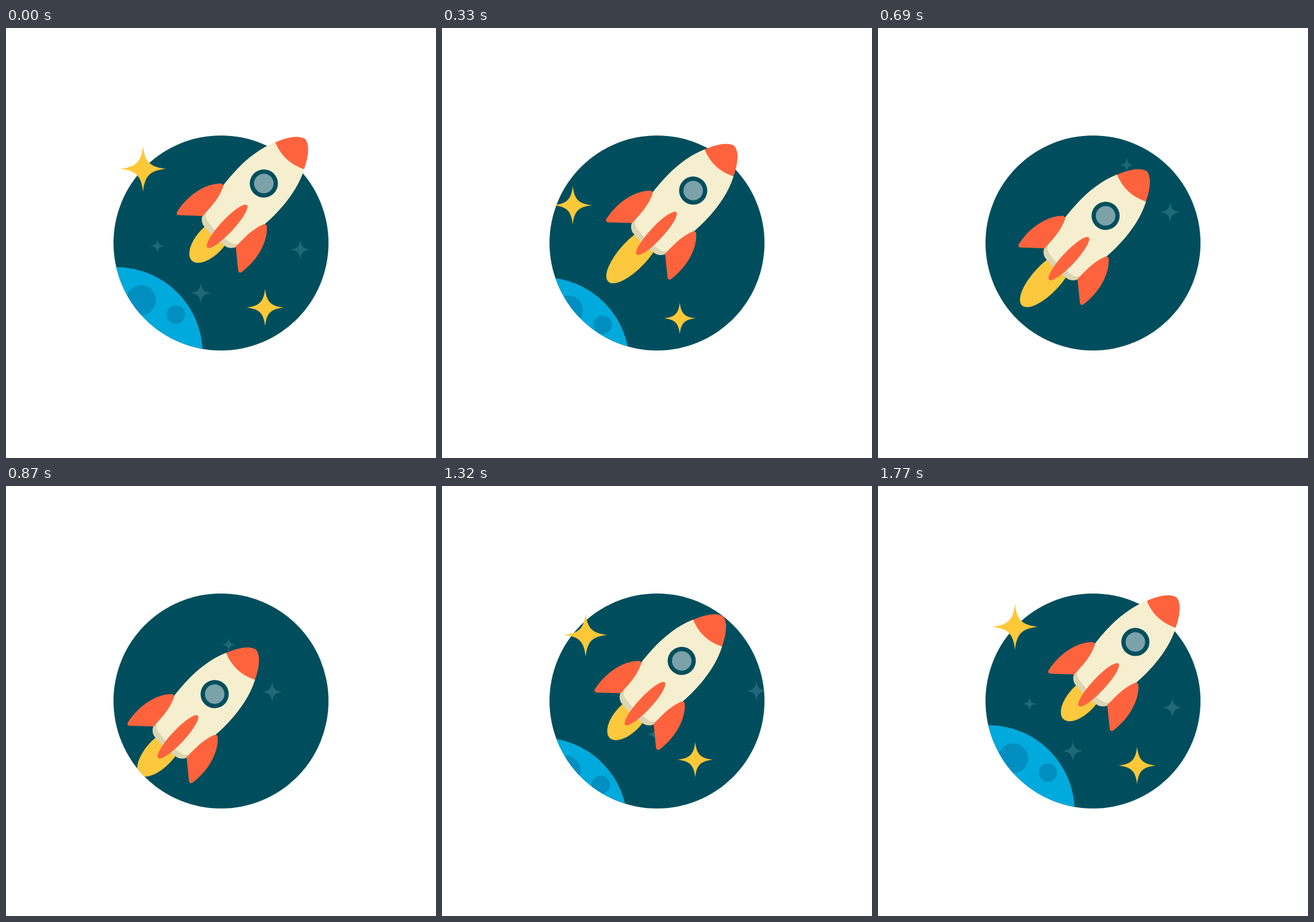
An HTML page that plays this animation: 748x748 px, repeating every 1800 ms.

```html
<!DOCTYPE html>
<html lang="en">
<head>
<meta charset="utf-8">
<title>Rocket</title>
<style>
html, body { margin: 0; width: 100%; height: 100%; overflow: hidden; background: #fff; }
svg { display: block; width: 748px; height: 748px; }
</style>
</head>
<body>
<svg viewBox="0 0 748 748">
  <defs>
    <clipPath id="disc"><circle cx="374" cy="374" r="187"/></clipPath>
    <!-- the disc, open towards the top -->
    <clipPath id="stageClip"><path d="M0 0H748V374H561A187 187 0 0 1 187 374H0Z"/></clipPath>
    <path id="star" d="M0-1C.08-.3 .3-.08 1 0C.3 .08 .08 .3 0 1C-.08 .3-.3 .08-1 0C-.3-.08-.08-.3 0-1Z"/>
    <path id="fin" d="M39 113.5C40 96 38 76 47.5 53Q50 48.5 54 50.5C70 64 84 98 77 138Q76 144 71 141.5Z"/>
    <path id="body" d="M-34.3-66C-46-42-51-12-51 18C-51 48-46 80-41 109Q-39 121-28 125Q0 130 28 125Q39 121 41 109C46 80 51 48 51 18C51-12 46-42 34.3-66Z"/>
    <clipPath id="bodyClip"><use href="#body"/></clipPath>
  </defs>
  <circle cx="374" cy="374" r="187" fill="#004e5d"/>
  <g clip-path="url(#disc)">
    <g id="farStars" fill="#206878">
      <use href="#star" transform="translate(512 385.5) scale(17.8)"/>
      <use href="#star" transform="translate(339 461) scale(18.3)"/>
      <use href="#star" transform="translate(263.5 379) scale(12.3)"/>
    </g>
    <g id="moon">
      <circle cx="192" cy="566" r="150" fill="#00aadd"/>
      <circle cx="235" cy="473.5" r="26" fill="#008fc0"/>
      <circle cx="295.500" cy="498.500" r="16" fill="#008fc0"/>
    </g>
  </g>
  <g clip-path="url(#stageClip)">
    <use id="bigStar" href="#star" fill="#ffc839"/>
    <use id="smallStar" href="#star" fill="#ffc839"/>
    <g id="rocket">
      <ellipse id="flame" rx="24.500" fill="#fcc83d"/>
      <use href="#body" fill="#dbd5b1"/>
      <path clip-path="url(#bodyClip)" fill="#f6efcf" d="M-60-70H60V98H43Q40 112 28 115Q0 120-26 115Q-39 112-42 98H-60Z"/>
      <path fill="#ff633d" d="M-34.300-66C-28-80-22-90-13.500-98.500Q-5-105.500 0-105.500Q5-105.500 13.500-98.500C22-90 28-80 34.300-66Q0-50-34.300-66Z"/>
      <g fill="#ff633d">
        <use href="#fin"/>
        <use href="#fin" transform="scale(-1 1)"/>
        <ellipse cx="4" cy="98" rx="11.500" ry="50.500"/>
      </g>
      <circle r="24.500" fill="#004e5d"/>
      <circle r="17" fill="#7ba2a8"/>
    </g>
  </g>
</svg>
<script>
const LOOP = 1800, STEP = 30, TURN = 900;
const el = id => document.getElementById(id);

// Monotone cubic curve through [time, value] keys.
function curve(keys) {
  const slope = i => (keys[i + 1][1] - keys[i][1]) / (keys[i + 1][0] - keys[i][0]);
  const last = keys.length - 1;
  const tangent = i => {
    if (i === 0) return slope(0);
    if (i === last) return slope(last - 1);
    const a = slope(i - 1), b = slope(i);
    return a * b <= 0 ? 0 : 2 * a * b / (a + b);
  };
  return t => {
    if (t <= keys[0][0]) return keys[0][1];
    if (t >= keys[last][0]) return keys[last][1];
    const i = keys.findIndex(k => k[0] > t) - 1;
    const [t0, v0] = keys[i], [t1, v1] = keys[i + 1];
    const h = t1 - t0, u = (t - t0) / h, w = 1 - u;
    return w * w * (1 + 2 * u) * v0 + u * u * (3 - 2 * u) * v1
      + h * u * w * (w * tangent(i) - u * tangent(i + 1));
  };
}

const rocketOut = curve([[0, 0], [180, 4.5], [480, 22.5], [870, 85.5], [900, 91]]);
const rocketBack = curve([[900, 91], [1080, 60.5], [1320, 31.5], [1620, 5], [1770, 0.8], [1800, 0]]);
const moonOut = curve([[0, 0], [180, 5], [480, 33], [900, 80]]);
const moonBack = curve([[900, 80], [1080, 46], [1320, 20.5], [1620, 2.5], [1740, 0]]);
const flameGrow = curve([[0, 0], [180, 8.5], [500, 22], [870, 4], [960, 0]]);
const farIn = curve([[540, 272], [870, 161], [1080, 108], [1320, 45.5], [1560, 5], [1700, 0]]);
const starIn = curve([[900, 1.35], [1080, 1], [1320, 0.138], [1560, 0]]);

const move = (node, x, y, rest = "") =>
  node.setAttribute("transform", `translate(${x} ${y}) ${rest}`);

// Stars sink away along `out`, then fly out from behind the rocket along `back`.
function placeStar(node, x, y, r, out, back, t) {
  const leaving = t < TURN;
  const k = leaving ? 0.31 * (t / 480) ** 1.86 : starIn(t);
  const [dx, dy] = leaving ? out : back;
  const size = Math.max(0, 1 - k * (leaving ? 1 : 0.36));
  move(node, x + dx * k, y + dy * k, `scale(${r * size})`);
}

function draw(t) {
  const leaving = t < TURN;

  const p = leaving ? rocketOut(t) : rocketBack(t);
  move(el("rocket"), 448.5 - p, 270.5 + 1.07 * p, "rotate(43)");
  const len = 48.5 + flameGrow(t);
  el("flame").setAttribute("ry", len);
  el("flame").setAttribute("cy", 86.5 + len);

  const m = leaving ? moonOut(t) : moonBack(t);
  move(el("moon"), -0.95 * m, 1.05 * m);

  if (t < 520) {
    const k = (t / 180) ** 1.7;
    move(el("farStars"), -100 * k, 58 * k);
  } else {
    const s = farIn(t);
    move(el("farStars"), 0.77 * s, -0.64 * s);
  }

  placeStar(el("bigStar"), 238.3, 245, 39.7, [-70, 410], [84, 102], t);
  placeStar(el("smallStar"), 450.7, 486.3, 32.5, [-240, 121], [-74, -74], t);
}

const start = performance.now();
function tick() {
  const t = (performance.now() - start) % LOOP;
  draw(Math.floor(t / STEP) * STEP);
  requestAnimationFrame(tick);
}
tick();
</script>
</body>
</html>
```
